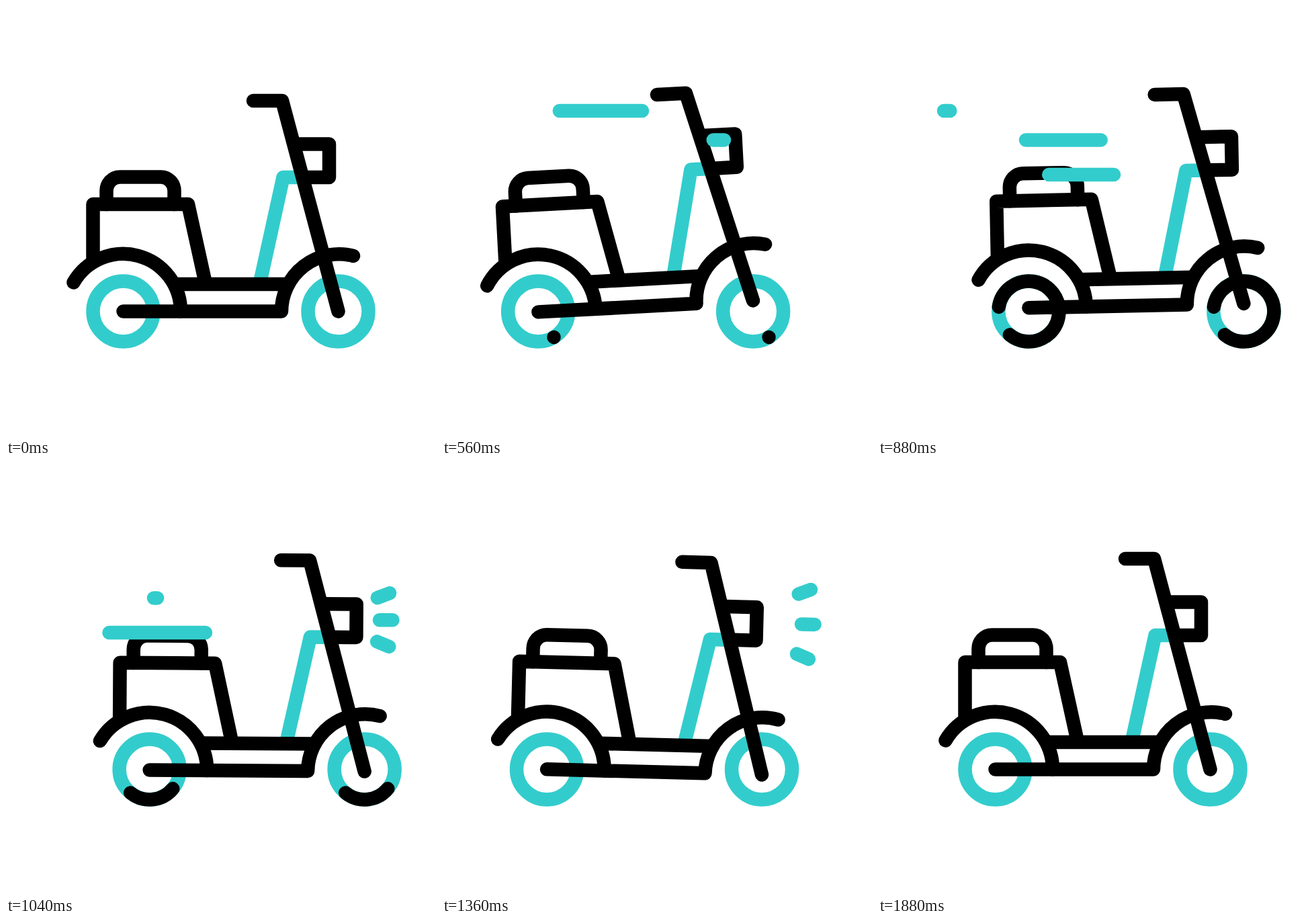
An HTML page for the animation above (2240 ms loop, 640 by 640 pixels).

```html
<!DOCTYPE html>
<html lang="en">
<head>
<meta charset="utf-8">
<title>Scooter</title>
<style>
  html, body { margin: 0; width: 100%; height: 100%; overflow: hidden; background: #fff; }
  svg { display: block; width: 100%; height: 100%; }
  svg * { fill: none; stroke-width: 20.5; stroke-linecap: round; stroke-linejoin: round; }
  .ink { stroke: #000; }
  .teal { stroke: #33cccc; }
  .butt { stroke-linecap: butt; }
</style>
</head>
<body>
<svg viewBox="0 0 640 640">
  <g id="wheels"></g>
  <g id="body">
    <path class="teal butt" d="M377.5 414 L412.5 255 H440"/>
    <g class="ink">
      <path d="M149.5 295 V275 A20 20.5 0 0 1 169.5 254.5 H230.5 A20 20.5 0 0 1 250.5 275 V295"/>
      <path d="M129.5 378 V295 H271 L297 413"/>
      <path d="M100.5 411.5 A85.5 85.5 0 0 1 260 454.5"/>
      <path d="M517 372 A85.5 85.5 0 0 0 410 454.5 H174.5"/>
      <path class="butt" d="M250 414 H420"/>
      <path d="M433 205.5 H481 V255 H447"/>
      <path d="M368 141 H411 L494.5 454.5"/>
    </g>
  </g>
  <g id="lines"></g>
</svg>
<script>
const LOOP = 2240, STEP = 40, SWEEP = 360;
const PIVOT = { x: 334.5, y: 454.5 };

// [time, value] keys, eased between neighbours
const shift = [[0, 0], [480, -39.3], [920, 52], [1360, -18.5], [1805, 0]];
const lift = [[0, 0], [300, 0.5], [750, -12.7], [1190, 7.5], [1620, -2.9], [1880, 0]];
const tilt = [[0, 0], [560, -3.05], [1280, 1.55], [1800, 0]];

const $ = id => document.getElementById(id);

function add(parent, tag, attrs) {
  const el = document.createElementNS("http://www.w3.org/2000/svg", tag);
  for (const k in attrs) el.setAttribute(k, attrs[k]);
  return parent.appendChild(el);
}

function ease(u) {
  u = Math.min(1, Math.max(0, u));
  return u * u * (3 - 2 * u);
}

function at(keys, t) {
  for (let i = 1; i < keys.length; i++) {
    const [t0, a] = keys[i - 1], [t1, b] = keys[i];
    if (t < t1) return a + (b - a) * ease((t - t0) / (t1 - t0));
  }
  return keys[keys.length - 1][1];
}

// The head runs ahead, the tail follows and wipes the stroke out.
function trim(t, start, delay) {
  return {
    head: ease((t - start) / SWEEP),
    tail: ease((t - start - delay) / SWEEP),
    on: t > start && t < start + delay + SWEEP
  };
}

const show = (el, on) => el.setAttribute("visibility", on ? "visible" : "hidden");

const arcs = [174.5, 494.5].map(cx => {
  const ring = { cx, cy: 454.5, r: 45 };
  add($("wheels"), "circle", { ...ring, class: "teal" });
  return add($("wheels"), "circle", { ...ring, class: "ink", pathLength: 360 });
});

function streak(parent, from, to, start, delay) {
  return { el: add(parent, "line", { class: "teal" }), from, to, start, delay };
}

const streaks = [
  streak($("lines"), [298, 156], [98, 156], 352, 215),
  streak($("lines"), [420, 199.5], [220, 199.5], 497, 217),
  streak($("lines"), [351, 251], [151, 251], 704, 213),
  streak($("body"), [512, 196], [560.6, 177.2], 890, 260),
  streak($("body"), [515.4, 229], [567.4, 229], 890, 260),
  streak($("body"), [511.8, 261.2], [560, 280.8], 890, 260)
];

function draw(t) {
  const dx = at(shift, t), dy = at(lift, t);
  $("wheels").setAttribute("transform", `translate(${dx} 0)`);
  $("body").setAttribute("transform",
    `translate(${dx} ${dy}) rotate(${at(tilt, t)} ${PIVOT.x} ${PIVOT.y})`);

  const spin = trim(t, 557, 240);
  for (const arc of arcs) {
    const angle = 90 + dx + 360 * spin.tail;
    const cx = arc.getAttribute("cx"), cy = arc.getAttribute("cy");
    show(arc, spin.on);
    arc.setAttribute("transform", `rotate(${angle} ${cx} ${cy})`);
    arc.setAttribute("stroke-dasharray", `${360 * (spin.head - spin.tail)} 720`);
  }

  for (const { el, from, to, start, delay } of streaks) {
    const { head, tail, on } = trim(t, start, delay);
    const mix = (i, u) => from[i] + (to[i] - from[i]) * u;
    show(el, on);
    el.setAttribute("x1", mix(0, tail));
    el.setAttribute("y1", mix(1, tail));
    el.setAttribute("x2", mix(0, head));
    el.setAttribute("y2", mix(1, head));
  }
}

const begin = performance.now();
function tick() {
  const t = (performance.now() - begin) % LOOP;
  draw(Math.floor(t / STEP) * STEP);
  requestAnimationFrame(tick);
}
tick();
</script>
</body>
</html>
```
